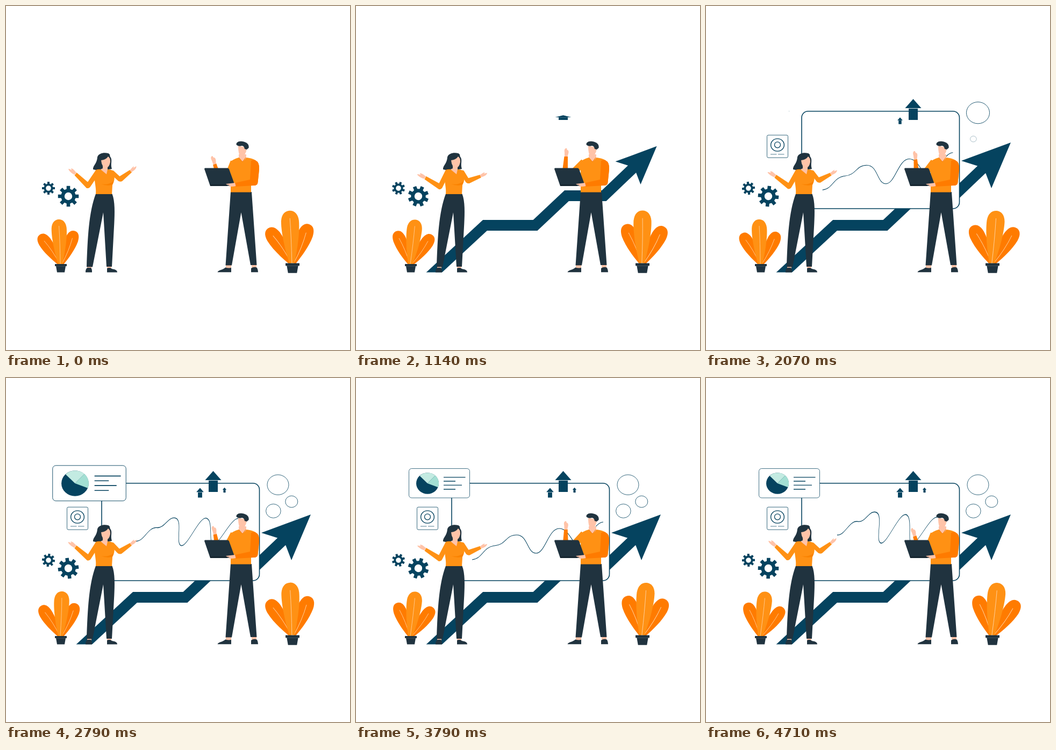
Recreate the animation shown at these times as an HTML page. Size 640 px wide and 640 px high, loop 4.78 s.

```html
<!DOCTYPE html>
<html lang="en">
<head>
<meta charset="utf-8">
<title>Growth presentation</title>
<style>
  html, body { margin: 0; width: 100%; height: 100%; overflow: hidden; background: #fff; }
  svg { display: block; width: 100vw; height: 100vh; }
  .navy { fill: #05435f; }
  .dark { fill: #20333f; }
  .skin { fill: #ffc3a8; }
  .top { fill: #ff9114; }
  .deep { fill: #ff7b00; }
  .line { fill: none; stroke: #05435f; }
  .box { fill: #fff; stroke: #05435f; }
  .vein { fill: none; stroke: #ffd09c; stroke-width: .8; }
  .sleeve { fill: none; stroke: #ff9114; }
</style>
</head>
<body>
<svg viewBox="0 0 640 640">
  <defs>
    <clipPath id="ground"><rect width="640" height="495.5"/></clipPath>
    <g id="midLeaf">
      <path class="top" d="M-4 0C-9 -18 -15 -48 -14 -67C-13 -78 -7 -83 0 -83S13 -78 14 -67C15 -48 9 -18 4 0Z"/>
      <path class="vein" d="M0 0Q1 -40 0 -71"/>
    </g>
    <g id="sideLeaf">
      <path class="deep" d="M-3 0C-8 -16 -12.500 -34 -12 -50C-11 -62 -6 -66 0 -66S11 -62 12 -50C12.500 -34 8 -16 3 0Z"/>
      <path class="vein" d="M0 0Q3 -28 0 -52"/>
    </g>
    <g id="plant">
      <path class="dark" d="M-11 0H11V4H9L7 15.500H-7L-9 4H-11Z"/>
      <path d="M-9 4.200H9" stroke="#5a6a73" stroke-width=".5"/>
    </g>
    <g id="upArrow" class="navy">
      <path d="M0 -19.500L15 -2.500H-15Z"/>
      <path d="M-8.500 -1.700H8.500V19.500H-8.500Z"/>
    </g>
  </defs>

  <g clip-path="url(#ground)">
    <path id="trend" class="line" stroke-width="20" pathLength="100" stroke-dasharray="100 200"
      d="M124.400 515L240 408H333.500L392 353H461.500L515 302"/>
  </g>
  <path id="head" class="navy" d="M567 254L475 288L505 297.500L520.500 311.500L531 339Z"/>

  <rect id="panel" class="box" x="178" y="195.700" width="293.500" height="181.300" rx="12" stroke-width="1.600"/>
  <path id="wave" class="line" stroke-width="1" pathLength="100" stroke-dasharray="100 200"
    d="M216 338C236 336 236 314 258 312S278 292 299 292S318 326 335 326S358 280 378 280S402 312 416 312S442 268 460 268"/>

  <use id="up1" href="#upArrow"/>
  <use id="up2" href="#upArrow"/>
  <use id="up3" href="#upArrow"/>
  <g class="line" stroke-width=".8">
    <ellipse id="ring1" cx="506" cy="198.700" rx="20" ry="18.700"/>
    <ellipse id="ring2" cx="497.400" cy="247.400" rx="13.800" ry="13"/>
    <ellipse id="ring3" cx="531.300" cy="230" rx="11.500" ry="10.800"/>
  </g>

  <g id="card">
    <rect class="box" x="98.500" y="168.500" width="113" height="54.500" rx="5" stroke-width=".75"/>
    <ellipse class="navy" cx="133" cy="196" rx="21" ry="19.700"/>
    <path fill="#c3ebe2" d="M133 196L118.500 182A21 19.700 0 0 1 147.500 181.500Z"/>
    <path fill="#a3dfd3" d="M133 196L147.500 181.500A21 19.700 0 0 1 152.500 203.300Z"/>
    <path class="line" stroke-width="1.300" d="M163 184.700H203.500M163 192H185M163 199.400H197M163 207H185"/>
  </g>

  <g id="badge">
    <rect class="box" x="113.500" y="240.200" width="39" height="42" rx="2.500" stroke-width=".8"/>
    <g class="line">
      <ellipse cx="133" cy="258.500" rx="12.400" ry="11.600" stroke-width="1.400"/>
      <circle cx="133" cy="258.300" r="5.500" stroke-width="1.300"/>
      <path d="M120 275.900H131.500M134 275.900H145.500" stroke-width=".7"/>
    </g>
  </g>

  <path id="gear1" class="navy" fill-rule="evenodd"/>
  <path id="gear2" class="navy" fill-rule="evenodd"/>

  <g id="plantL"></g>
  <g id="plantR"></g>

  <g id="woman">
    <path class="skin" d="M151 483H159V490H151ZM188 483H196V490H188Z"/>
    <path class="dark" d="M148 495.500C148 490 150 487 152 487H158C160 489 160 492 160 495.500ZM188 495.500V488C192 486 195 487 197 489C202 490 207 491 207 495.500Z"/>
    <path class="dark" d="M167 349.500H197.500C203 363 202.300 386 201.300 405L197 485H187L181 384L161 485.500H150C152 430 154 384 167 349.500Z"/>
    <path class="dark" d="M170 281C172 274 182 272 190 274C195 276 192 279 195 282C198 288 194 294 197 303Q190 305 184 303Q174 307 162 304C162 296 169 294 170 281Z"/>
    <g id="armL">
      <path class="sleeve" stroke-width="9" stroke-linecap="round" d="M170 309L153 334"/>
      <g id="foreL">
        <path class="top" d="M150 339L127.500 315L131.500 310L155 330Q158 337 153 339Z"/>
        <path class="skin" d="M127.500 314C123 312 117 307 116 303C119 303 121 305 122 305L121 302C126 303 127 306 131 310Z"/>
      </g>
    </g>
    <g id="armR">
      <path class="sleeve" stroke-width="8" stroke-linecap="round" d="M198 310L211 322"/>
      <g id="foreR">
        <path class="top" d="M208 319L230.500 305L234 309.500L216 326Q211 328 208 324Z"/>
        <path class="skin" d="M230.500 306C233 302 236 299 238 298L237 301L242.500 298C243 302 239 306 233.500 309Z"/>
      </g>
    </g>
    <path class="top" d="M167 305Q172 303 177 304H189Q197 304 200 308C203 318 202 326 198 333L197 350H167C169 336 161 320 167 305Z"/>
    <path fill="#fa8200" d="M177 331Q190 334 200 326Q199 333 196 333Q187 335 177 331Z"/>
    <path class="skin" d="M176 304L180 302V296H189V304L187 313Z"/>
    <path class="skin" d="M177 287Q186 286 190 280Q194 282 194 290Q192 301 186 301Q178 300 177 287Z"/>
  </g>

  <g id="man">
    <path class="skin" d="M409 480H419V490H409ZM457 480H466V490H457Z"/>
    <path class="dark" d="M393.500 495.300C395 491 404 491 408 486.500Q414 488 419 487V495.300ZM456 495.300V488Q462 484 467 487Q469 491 469 495.300Z"/>
    <path class="dark" d="M418 346H457L466.500 482H455L437.500 384L420 482.500H408.500Z"/>
    <path id="upperArm" class="sleeve" stroke-width="13"/>
    <g id="foreM">
      <path class="deep" d="M384 306L387.500 280H394L394 306Z"/>
      <path class="skin" d="M388 280V272C387 267 389 264 392 264.500L393 268Q396 268 395.500 273L393.500 280Z"/>
    </g>
    <path class="top" d="M418 289Q427 283 434 282H447Q458 283 464 287Q472 291 471 304L468.500 328Q468 334 461 334L456 333V346.500H418Z"/>
    <path class="deep" d="M456 288Q460 285 464 287Q472 291 471 304L468.500 328Q468 334 461 334L427 336L426 329L454 323Z"/>
    <path class="skin" d="M433 276H447V283L440 290L433 282Z"/>
    <path d="M433 282L440 290L446 282" fill="none" stroke="#f57900"/>
    <path class="skin" d="M432 260Q440 262 445 262Q449 265 447 270Q444 280 438 280Q432 279 432 260Z"/>
    <path class="dark" d="M428.500 258C428 253 434 251 440 252C447 253 453 257 451.500 264L448 267L444 266Q443 260 439 260Q432 262 428.500 258Z"/>
    <path class="dark" d="M370 301.500H412Q414 301.500 415 303.500L425 331Q425 332.500 423 332.500L411 335H380L369 303Z"/>
    <path d="M380 333.300H411" stroke="#111f28" stroke-width="1.500"/>
    <path class="skin" d="M409 331Q418 330 426 329L427.500 335Q418 337 413 335L416 333Q411 333.500 409 331Z"/>
  </g>
</svg>
<script>
const LOOP = 4780, FPS = 14;
const $ = id => document.getElementById(id);
const set = (id, transform) => $(id).setAttribute('transform', transform);
const clamp = (x, a = 0, b = 1) => Math.min(b, Math.max(a, x));
const ramp = (t, a, b) => clamp((t - a) / (b - a));
const wave = x => (1 - Math.cos(Math.PI * x)) / 2;

// Eased value through [time, value] stops.
function keys(t, stops) {
  let [t0, v0] = stops[0];
  for (const [t1, v1] of stops) {
    if (t < t1) return t <= t0 ? v0 : v0 + (v1 - v0) * wave(ramp(t, t0, t1));
    [t0, v0] = [t1, v1];
  }
  return v0;
}

// Grow from nothing, overshoot, settle.
const pop = (t, start, up, down, peak = 1.25) =>
  keys(t, [[start, 0], [start + up, peak], [start + up + down, 1]]);

const scaleAt = (id, x, y, s) => {
  $(id).style.display = s > .005 ? '' : 'none';
  set(id, `translate(${x} ${y}) scale(${s}) translate(${-x} ${-y})`);
};

function gearPath(outer, body, hole) {
  const pts = [];
  for (let i = 0; i < 8; i++) {
    for (const [r, da] of [[body, -.24], [outer, -.17], [outer, .17], [body, .24]]) {
      const a = i * Math.PI / 4 + da;
      pts.push(`${(r * Math.cos(a)).toFixed(2)} ${(r * Math.sin(a)).toFixed(2)}`);
    }
  }
  return `M${pts.join('L')}ZM${hole} 0A${hole} ${hole} 0 1 0 ${-hole} 0A${hole} ${hole} 0 1 0 ${hole} 0Z`;
}

$('gear1').setAttribute('d', gearPath(19.5, 13.8, 7.2));
$('gear2').setAttribute('d', gearPath(12.2, 8.6, 4.8));

// Leaf: symbol, base x, rest angle, swing, delay, half period
const plants = {
  plantL: { x: 102, y: 480, k: 1, leaves: [
    ['sideLeaf', -2, -34, 12.5, 230, 1130],
    ['sideLeaf', 2, 22, 14.5, 240, 1130],
    ['midLeaf', -1, -2, 8.8, -30, 1130]] },
  plantR: { x: 533, y: 478.5, k: 1.18, leaves: [
    ['sideLeaf', -2, -33.5, 13, 225, 1250],
    ['sideLeaf', 2, 22, 13.5, 480, 1250],
    ['midLeaf', -1, -2.5, 9, 670, 1130]] }
};

for (const [id, p] of Object.entries(plants)) {
  set(id, `translate(${p.x} ${p.y}) scale(${p.k})`);
  $(id).innerHTML = p.leaves.map(l => `<use href="#${l[0]}"/>`).join('') + '<use href="#plant"/>';
}

function sway(t) {
  for (const [id, p] of Object.entries(plants)) {
    p.leaves.forEach(([, x, rest, swing, delay, half], i) => {
      const a = rest + swing * wave(clamp((t - delay) / half, 0, 3));
      $(id).children[i].setAttribute('transform', `translate(${x} 0) rotate(${a})`);
    });
  }
}

function gesture(t) {
  const g = keys(t, [[0, 0], [1140, 1], [1800, .95], [2450, 0], [3500, 1], [4710, 0]]);
  set('armL', `rotate(${-8 * g} 168 309)`);
  set('foreL', `rotate(${-4 * g} 152 336)`);
  set('armR', `rotate(${16 * g} 199 310)`);
  const up = 1 - g;
  set('foreM', `translate(${4.4 * up} ${13.5 * up}) rotate(${-20 * up} 389 300)`);
  $('upperArm').setAttribute('d', `M424 290L${416 - 12 * g} 310`);
}

function arrows(t) {
  $('trend').setAttribute('stroke-dashoffset', 100 * (1 - ramp(t, 0, 430)));
  const h = 1 - ramp(t, 205, 1774);
  scaleAt('head', 521.5, 296.4, 1 - h * h);
  set('up1', `translate(385.500 212) scale(1 ${pop(t, 947, 700, 423, 1.256)}) translate(0 -19.500)`);
  set('up2', `translate(361 213.500) scale(${.46 * pop(t, 1770, 560, 400)})`);
  set('up3', `translate(406.500 208.500) scale(${.24 * pop(t, 2030, 450, 300)})`);
}

function board(t) {
  scaleAt('panel', 325, 286.3, wave(ramp(t, 1250, 1800)));
  scaleAt('card', 155, 195.8, pop(t, 2000, 890, 560, 1.25));
  scaleAt('badge', 133, 261, pop(t, 1430, 400, 240, 1.15));
  scaleAt('ring1', 506, 198.7, pop(t, 1430, 480, 280, 1.2));
  scaleAt('ring2', 497.4, 247.4, pop(t, 1890, 450, 300, 1.2));
  scaleAt('ring3', 531.3, 230, pop(t, 2070, 420, 280, 1.2));

  // The curve leans and stretches, a little less on its first swing.
  const swing = first => keys(t, [[1990, 0], [2890, first], [3790, 0], [4710, 1]]);
  const sx = swing(.95), sy = swing(.77);
  const drop = keys(t, [[2070, 5], [2790, 0]]);
  const m = [1 - .3635 * sx, .2666 * sy, -.438 * sx, 1 + .394 * sy, 254.6 * sx, drop - 236.8 * sy];
  set('wave', `matrix(${m.join(' ')})`);
  $('wave').setAttribute('stroke-dashoffset', 100 * (1 - ramp(t, 1650, 2000)));
}

function draw(now) {
  const t = Math.floor((now % LOOP + 5) * FPS / 1000) * 1000 / FPS;
  sway(t);
  gesture(t);
  arrows(t);
  board(t);
  const turn = 90 * t / LOOP;
  set('gear1', `translate(116 354) rotate(${-turn})`);
  set('gear2', `translate(79 339) rotate(${turn})`);
}

const start = performance.now();
function tick() {
  draw(performance.now() - start);
  requestAnimationFrame(tick);
}
tick();
</script>
</body>
</html>
```
